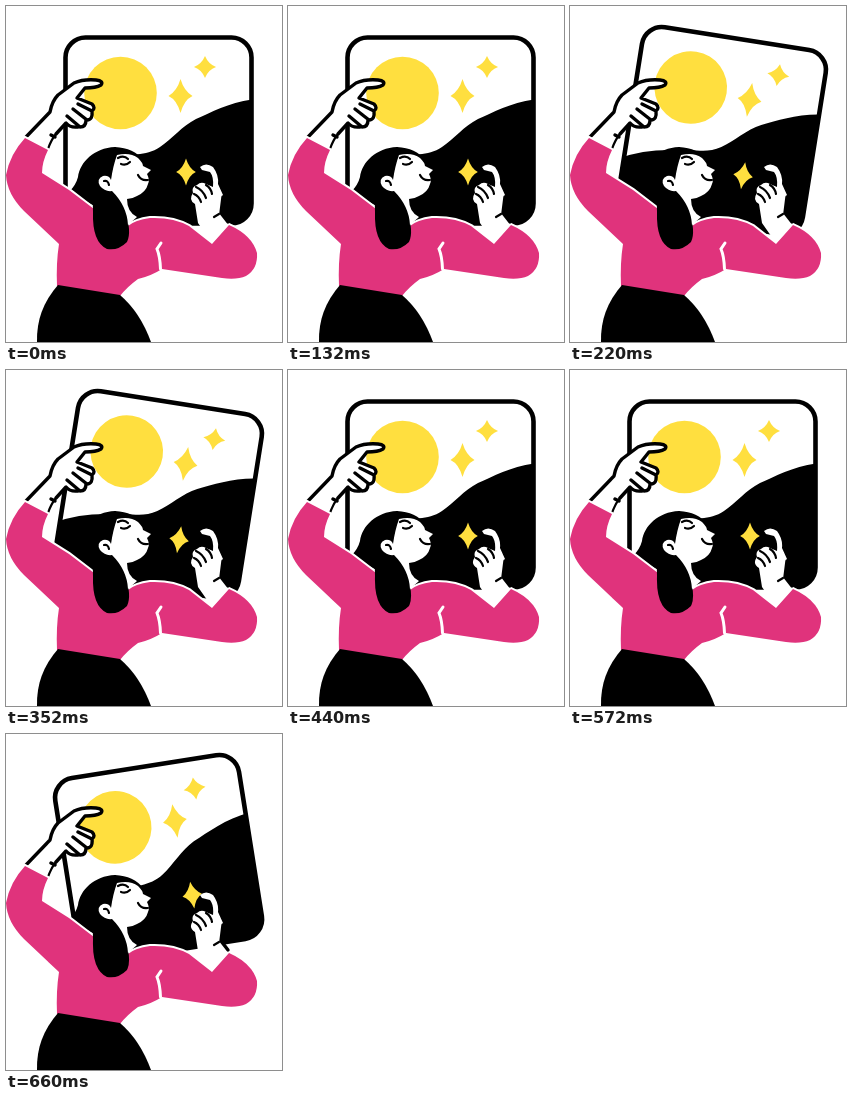
An HTML page for the animation above (880 ms loop, 276 by 336 pixels).

```html
<!DOCTYPE html>
<html lang="en">
<head>
<meta charset="utf-8">
<title>Tilting picture</title>
<style>
html, body { margin: 0; width: 100%; height: 100%; overflow: hidden; background: #fff; }
svg { display: block; width: 276px; height: 336px; }
.line { fill: none; stroke: #000; stroke-width: 3.4; stroke-linecap: round; stroke-linejoin: round; }
.thin { stroke-width: 2.2; }
.skin { fill: #fff; }
.pink { fill: #e0337c; }
.sun { fill: #ffdf3f; }
</style>
</head>
<body>
<svg viewBox="0 0 276 336">
  <defs>
    <path id="star" d="M0-17Q3.5-5 12 0Q3.5 4 0 17Q-3.5 4-12 0Q-3.5-5 0-17Z"/>
    <clipPath id="inside"><rect x="59" y="31" width="187" height="186" rx="20"/></clipPath>
  </defs>

  <g id="picture">
    <rect x="59.5" y="31.5" width="186" height="186" rx="20" fill="#fff" stroke="#000" stroke-width="4.6"/>
    <g clip-path="url(#inside)">
      <path d="M104 151C125 147 139 151 154 141C166 133 176 120 190 113C206 106 224 96 250 93V222H104Z"/>
      <path id="slope" d="M55 168Q78 155 110 151V222H55Z"/>
    </g>
    <circle class="sun" cx="114.5" cy="87" r="36.3"/>
    <g class="sun">
      <use href="#star" transform="translate(174.5 90)"/>
      <use href="#star" transform="translate(199 61) scale(.92 .65)"/>
      <use href="#star" transform="translate(180 166) scale(.82 .8)"/>
    </g>
  </g>

  <!-- raised arm -->
  <path class="skin" d="M19 132L44 106Q46 95 52 89L68 77Q77 73 90 74Q98 75 95 79Q90 82 79 82L72 91L86 98Q90 102 86 105Q87 114 81 114Q80 121 74 121Q64 122 60 117L50 128L42 144L37 166L20 180Z"/>
  <path class="line" d="M20 131L44 106Q46 95 52 89L68 77Q77 73 90 74Q98 75 95 79Q90 82 79 82L71 92L86 98Q90 102 86 105L72 98M86 105Q87 114 81 114L67 103M80 114Q80 121 74 121L61 110M72 121Q64 122 60 117L50 128M45 129L49 131"/>
  <path class="line thin" d="M50 128Q45 134 42 143"/>

  <!-- back hair, sweater and skirt -->
  <path d="M109 141C88 142 74 156 72 171Q70 179 63 186L110 212V141Z"/>
  <path class="pink" stroke="#fff" stroke-width="4" paint-order="stroke" d="M19 132L42 144Q36 156 36 167L63 184L88 203L122 220Q129 214 144 212Q167 211 183 220L206 238L223 219Q246 229 251 247Q252 263 240 270Q231 274 216 272L156 263Q145 270 132 273Q121 281 114 290L51 280Q50 257 53 238L18 205Q1 188 0 169Q4 148 19 132Z"/>
  <path d="M155 237L151 243Q154 250 154.500 263" fill="none" stroke="#fff" stroke-width="3" stroke-linecap="round"/>
  <path d="M52 279L114 289Q134 306 145 336H31Q30 304 52 279Z"/>

  <!-- hair and face -->
  <path d="M109 141Q128 142 137 154L140 166L122 193L119 204Q126 226 121 236Q112 245 101 243Q86 236 87 206L86 160Z"/>
  <path class="skin" d="M111 149Q124 146 132 152Q137 157 137 160L145 164L141 168Q144 174 142 178Q140 186 131 190Q126 193 121 193Q121 206 131 211L122 219Q121 200 106 185Q99 186 94 180Q90 173 97 170Q103 169 105 174Q107 160 111 149Z"/>
  <path class="line thin" d="M112 152Q118 149 122 153M115 158Q120 160 124 156M98 175Q102 174 103 179M132 169Q135 175 142 174"/>

  <!-- holding hand -->
  <path class="skin" d="M194 161Q200 156 207 161Q213 169 212 178L217 189L214 207L223 218L206 237L192 217L189 198Q182 194 187 187Q185 181 191 179Q195 175 200 178L207 181Q208 171 204 166L196 164Z"/>
  <path class="line thin" d="M190 181Q197 184 200 192M188 188Q193 190 195 196M200 179Q205 182 206 188M208 211L213 208"/>
  <path class="line" d="M217 191L215 207L222 216"/>
</svg>
<script>
const picture = document.getElementById('picture');
const slope = document.getElementById('slope');
const angles = [0, 9, 0, -9];

function draw(now) {
  const angle = angles[Math.floor(now % 880 / 220)];
  picture.setAttribute('transform', `rotate(${angle} 152.5 124)`);
  slope.setAttribute('visibility', angle > 0 ? 'visible' : 'hidden');
  requestAnimationFrame(draw);
}
draw(performance.now());
</script>
</body>
</html>
```
